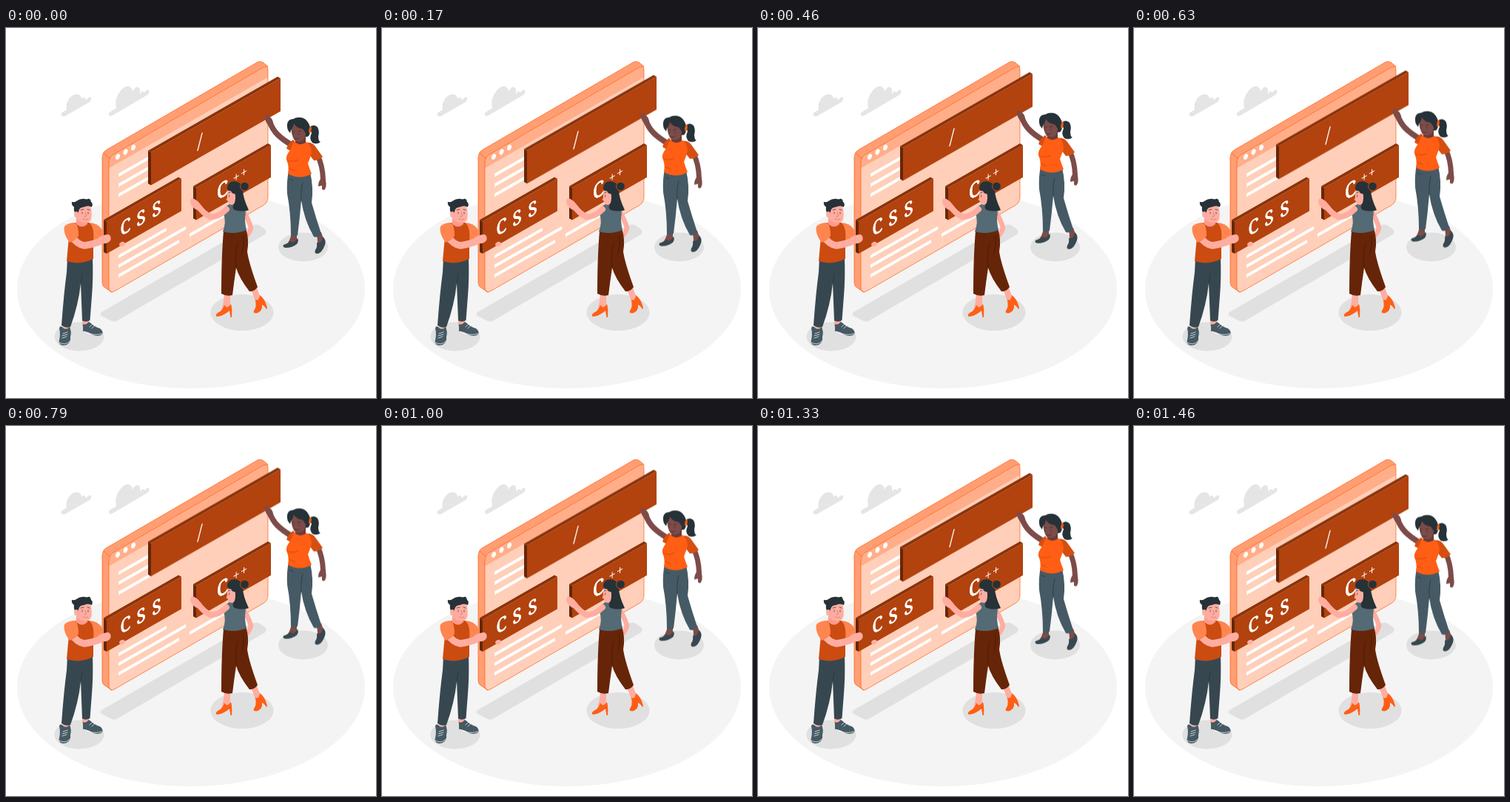
Animation, 500 px wide and 500 px high, one loop 1500 ms. Source, as an HTML page:

```html
<!DOCTYPE html>
<html lang="en">
<head>
<meta charset="utf-8">
<title>Web development</title>
<style>
  html, body { margin: 0; width: 100%; height: 100%; overflow: hidden; background: #fff; }
  svg { display: block; width: 100vw; height: 100vh; }
  text { font-family: "Noto Serif", serif; fill: #fff; text-anchor: middle; stroke: #fff; stroke-width: .9; }
  .plus { stroke-width: 0; }
  .slash { font-family: "Liberation Serif", serif; stroke-width: .3; }
  .limb { fill: none; stroke-linecap: round; stroke-linejoin: round; }
  .thin { fill: none; stroke-width: .7; stroke-linecap: round; }
</style>
</head>
<body>
<svg viewBox="0 0 500 500">
  <ellipse cx="250" cy="353" rx="235" ry="134" fill="#f4f4f4"/>
  <g fill="#e0e0e0">
    <path d="M129 384L332 267Q338 264 343 267L350 272Q353 275 350 279L151 395Q146 398 141 395L129 389Q126 387 129 384Z"/>
    <ellipse cx="99" cy="417" rx="33.5" ry="19.5"/>
    <ellipse cx="319" cy="384.500" rx="42.500" ry="24.500"/>
    <ellipse cx="401.500" cy="296" rx="33.500" ry="19.500"/>
  </g>
  <g fill="#e5e5e5">
    <path d="M76 114L82 110.500Q80 103 85 96Q91 88 98 90Q102 91 102 96Q106 91 108 97L112 94Q116 92 115 97Q115 99 112 100.500L79 119.500Q75 120 74.500 117.500Q74 115 76 114Z"/>
    <path d="M141 113L149 108.500Q146 96 154 86Q162 76 168 80Q171 82 171 86Q176 77 180 81Q182 84 181 89Q185 83 187 87L191 83.500Q194 83 193.500 87Q193 89 190 91L144 118Q140 120 139 117.500Q138 115 141 113Z"/>
  </g>

  <g id="page">
    <path d="M130 176Q130 168 136 164.500L340 46Q344 44 348 47L354 52L354 70L143 357L134 351Q130 349 130 344Z" fill="#ff9e72"/>
    <path d="M139 183Q139 175 144 171.500L347 53.500Q354 50 354 57V228Q354 236 348 239.500L147 355.500Q139 360 139 350Z" fill="#ffcfb9"/>
    <path d="M139 189.500V183Q139 175 144 171.500L347 53.500Q354 50 354 57V66.500Z" fill="#ffae89"/>
    <g class="thin" stroke="#ff5e14">
      <path d="M139 183Q139 175 144 171.500L347 53.500Q354 50 354 57V228Q354 236 348 239.500L147 355.500Q139 360 139 350Z"/>
      <path d="M132 169L140 176M130 176Q130 168 136 164.500L340 46Q344 44 348 47L354 52M130 176V344Q130 349 134 351L143 357"/>
    </g>
  </g>

  <g id="man">
    <path d="M77 398H86V409H77ZM103 390H112V403H103Z" fill="#ffada0"/>
    <g fill="#455a64">
      <path d="M72 405Q74 401 78 406Q83 408 86 404Q89 411 87 417Q88 425 82 428Q73 431 71.500 424Q74 415 72 405Z"/>
      <path d="M104 400Q108 402 112 397L116 400Q120 404 127 406Q132 410 130 414Q124 418 116 414Q111 410 104 410Z"/>
    </g>
    <path class="thin" stroke="#fff" d="M77 413L83 411M76 416L83 414M76 419L82 417M113 404L117 400M116 406L120 402M72 425Q79 430 87 423M105 410Q118 417 130 413"/>
    <path d="M83 311L117 309Q118 338 116 362L113.500 395Q108 398 103 395.500L101 345Q98 374 87 404Q81 406 75 402Q78 360 82 330Z" fill="#37474f"/>
    <path class="thin" stroke="#263238" d="M101 345L103 332"/>
    <path d="M112 263Q124 263 130 273L132 286L118 289Z" fill="#ff8550"/>
    <path d="M94 263L112 263Q120 268 118 289L118 312Q100 321 82 315L85 282Q84 268 94 263Z" fill="#cc4b10"/>
    <path d="M95 255H110V265Q103 272 95 265Z" fill="#ff9a8c"/>
    <path d="M94 240Q105 232 114 240Q117 251 115 259Q111 265 105 263Q96 262 94 254Z" fill="#ffada0"/>
    <path d="M89 235Q93 236 95 234Q102 229 109 231.500Q114 229 115 235Q118 237 116 242Q111 239 105 242Q99 242 98 248L97 252L94 251Q91 247 92 242Q88 239 89 235Z" fill="#263238"/>
    <ellipse cx="95" cy="252" rx="3" ry="4" fill="#ffada0"/>
    <g class="thin" stroke="#263238">
      <path d="M101 246L105 245M110 245L113 246M103 249V251M111 249V251"/>
      <path d="M107 249L108.500 254L106 255M104 258Q107 260 111 258.500" stroke="#d36f65"/>
    </g>
  </g>

  <g id="boards"></g>

  <g id="man-arm">
    <ellipse cx="157" cy="292" rx="4" ry="3" transform="rotate(-25 157 292)" fill="#ffada0"/>
    <path class="limb" d="M87 279Q96 293 106 294Q119 292 128 288" stroke="#ffada0" stroke-width="9.500"/>
    <path d="M124 284Q131 279 139 279Q143 282 141 287Q138 292 130 291L124 293Z" fill="#ffada0"/>
    <path d="M94 263Q84 263 79 268Q77 274 82 284L86 290Q93 288 98 281Q98 268 94 263Z" fill="#ff8550"/>
  </g>

  <g id="coder">
    <path d="M295 357L303 357L303 376Q296 386 287 388Q294 380 295 357ZM330 352L338 349L344 364Q346 378 338 383Q340 372 330 352Z" fill="#ffada0"/>
    <path d="M295 374Q298 381 304 373Q306 379 305 391H303.500L302 382Q294 389 285 390Q282 388 286 385Q293 382 295 374ZM337 367Q342 370 343 361Q350 366 353 378L352 380Q349 375 346 374Q347 382 340 385Q333 386 335 382Q339 377 337 367Z" fill="#ff5e14"/>
    <path class="limb" d="M321 248Q329 261 331 270Q330 276 323 283" stroke="#ffada0" stroke-width="6.500"/>
    <path d="M294 274L324 271Q329 286 326 302Q328 317 340 350Q336 356 329 356Q315 338 311 324Q308 344 306 361Q298 363 291 359Q291 309 294 274Z" fill="#662508"/>
    <path class="thin" stroke="#451703" d="M311 324Q309 303 313 291M321 281Q322 293 319 304"/>
    <path d="M301 230H313V243L301 244Z" fill="#ff9a8c"/>
    <path d="M299 240Q304 236 316 237Q326 242 323 256Q323 266 325 273Q309 280 293 275Q298 263 294 250Q294 243 299 240Z" fill="#546a74"/>
    <path class="limb" d="M298 245Q288 255 277 255.500Q267 251 260 241" stroke="#ffada0" stroke-width="8"/>
    <path d="M250 231Q253 229 256 232Q262 235 264 242L258 246Q250 242 249 235Z" fill="#ffada0"/>
    <path d="M300 217Q298 225 299 229L297.500 232L300 234Q300 239 306 239L313 234V217Z" fill="#ffada0"/>
    <path d="M299 217Q299 207 309 207Q319 208 320 219Q320 229 328 246Q320 249 309 246Q304 243 309 236Q311 229 309 224Q305 224 304 220Q300 221 299 217Z" fill="#263238"/>
    <circle cx="322.500" cy="214" r="6" fill="#263238" stroke="#d64f11" stroke-width=".9"/>
    <ellipse cx="308" cy="227" rx="2" ry="3" fill="#ffada0"/>
    <path class="thin" stroke="#263238" d="M301.500 226V228M300.500 223L303 222"/>
  </g>

  <g id="lift">
    <g id="lift-board"></g>
    <path d="M386 276H393V290Q386 296 378 293Q384 289 386 276ZM419 276H426L430 288Q425 301 419 300Q423 290 419 276Z" fill="#7d4b48"/>
    <path d="M385 288Q388 293 394 284Q396 288 393 292Q387 297 378 297Q373 296 375 293Q380 292 385 288ZM420 290Q427 292 428 282Q433 286 431 293Q427 304 421 305Q416 305 418 300Q421 296 420 290Z" fill="#37474f"/>
    <path d="M382 193L411 195Q416 216 413 236Q419 257 426 278Q422 284 416 282Q403 260 399 233Q397 257 394 280Q389 283 385 280Q385 250 380 224Q379 207 382 193Z" fill="#455a64"/>
    <path class="thin" stroke="#263238" d="M399 233Q398 219 401 209M383 204L388 206"/>
    <path class="limb" d="M386 158Q374 151 367 144Q360 137 356.500 127" stroke="#7d4b48" stroke-width="7.500"/>
    <path d="M350 118Q353 116 356 120Q360 122 361 128L355 132Q349 126 350 118Z" fill="#7d4b48"/>
    <path class="limb" d="M421 172Q428 186 428.500 205" stroke="#7d4b48" stroke-width="7"/>
    <path d="M425 204Q430 201 432 206Q434 215 430 219L427 218V213L422 214Q422 208 425 204Z" fill="#7d4b48"/>
    <path d="M388 151L392 155L386 167L379 163Q381 156 388 151ZM405 155Q414 154 418 160L428 174Q423 179 416 179L408 169Z" fill="#d64f11"/>
    <path d="M391 145H405V158Q399 164 391 157Z" fill="#693b39"/>
    <path d="M389 153Q398 161 406 154Q412 157 413 168Q411 176 408 183Q410 190 413 197Q397 206 381 197Q383 187 379 178Q378 172 384 165Z" fill="#ff5e14"/>
    <path class="thin" stroke="#c84508" d="M381 179Q389 182 395 178M383 190L390 193"/>
    <path d="M385 130Q395 122 405 131Q407 143 403 150Q397 156 390 152Q385 145 385 130Z" fill="#7d4b48"/>
    <path d="M380 130Q381 123 388 123Q393 120 399 121Q406 122 410 131Q413 140 409 146Q406 148 404 146Q405 139 400 136Q393 136 389 129Q388 135 385 138L384 142Q379 137 380 130Z" fill="#263238"/>
    <path d="M410 134Q416 129 421 134Q424 140 422 146Q422 153 425 154Q420 158 414 155Q409 149 413 142Z" fill="#263238"/>
    <ellipse cx="411" cy="137.500" rx="1.600" ry="4.500" transform="rotate(10 411 137.500)" fill="#ff5e14"/>
    <ellipse cx="403" cy="143.500" rx="2" ry="3" fill="#7d4b48"/>
    <path class="thin" stroke="#263238" d="M387 139.500L390 140M394 140L398 139M388 142.500V144M396 142.500V144M390 149Q393 151 396 149"/>
  </g>
</svg>
<script>
const SLOPE = 4 / 7;
const byId = id => document.getElementById(id);

function add(parent, tag, attrs, content = '') {
  const el = document.createElementNS('http://www.w3.org/2000/svg', tag);
  for (const key in attrs) el.setAttribute(key, attrs[key]);
  el.textContent = content;
  parent.append(el);
}

// Line of placeholder text lying on the slanted page
function row(x, y, w) {
  add(byId('page'), 'path', {
    d: `M${x} ${y - 2.2}l${w} ${-w * SLOPE}v4.400l${-w} ${w * SLOPE}z`, fill: '#fff'
  });
}

// Slab whose front face has its top left corner at x, y
function slab(parent, x, y, w, h) {
  const rise = w * SLOPE;
  add(parent, 'path', { d: `M${x} ${y}l-4-2.300v${h}l4 2.300z`, fill: '#66260a' });
  add(parent, 'path', { d: `M${x} ${y}l-4-2.300l${w} ${-rise}l4 2.300z`, fill: '#8a330b' });
  add(parent, 'path', { d: `M${x} ${y}l${w} ${-rise}v${h}l${-w} ${rise}z`, fill: '#b2420e' });
}

// Glyph sheared onto a slab, centred on x with its baseline at y
function glyph(parent, char, x, y, size, cls = '') {
  add(parent, 'text', {
    transform: `matrix(.866 -.495 0 1 ${x} ${y})`, 'font-size': size, class: cls
  }, char);
}

for (const [x, y] of [[151, 174], [161.5, 167.5], [172, 161.5]]) {
  add(byId('page'), 'ellipse', {
    cx: x, cy: y, rx: 2.7, ry: 4, fill: '#fff', transform: `rotate(25 ${x} ${y})`
  });
}
for (const y of [199, 212.5, 226]) row(152, y, 42);
row(152, 309, 65);
row(152, 322, 91);
row(152, 335, 82);
row(248, 280, 48);

const boards = byId('boards');
slab(boards, 136, 261.5, 101, 43.5);
slab(boards, 257, 216, 101, 43.5);
glyph(boards, 'C', 161.5, 277.5, 26);
glyph(boards, 'S', 182.5, 265.5, 26);
glyph(boards, 'S', 203.5, 253.5, 26);
glyph(boards, 'C', 292.5, 228.5, 28);
glyph(boards, '+', 311, 208, 19, 'plus');
glyph(boards, '+', 321.5, 201.5, 19, 'plus');

slab(byId('lift-board'), 196, 168, 175, 44.5);
glyph(byId('lift-board'), '/', 262, 164, 31, 'slash');

byId('lift').animate(
  [0, -10, 0].map(y => ({ transform: `translateY(${y}px)` })),
  { duration: 1500, iterations: Infinity, easing: 'linear' }
);
</script>
</body>
</html>
```
